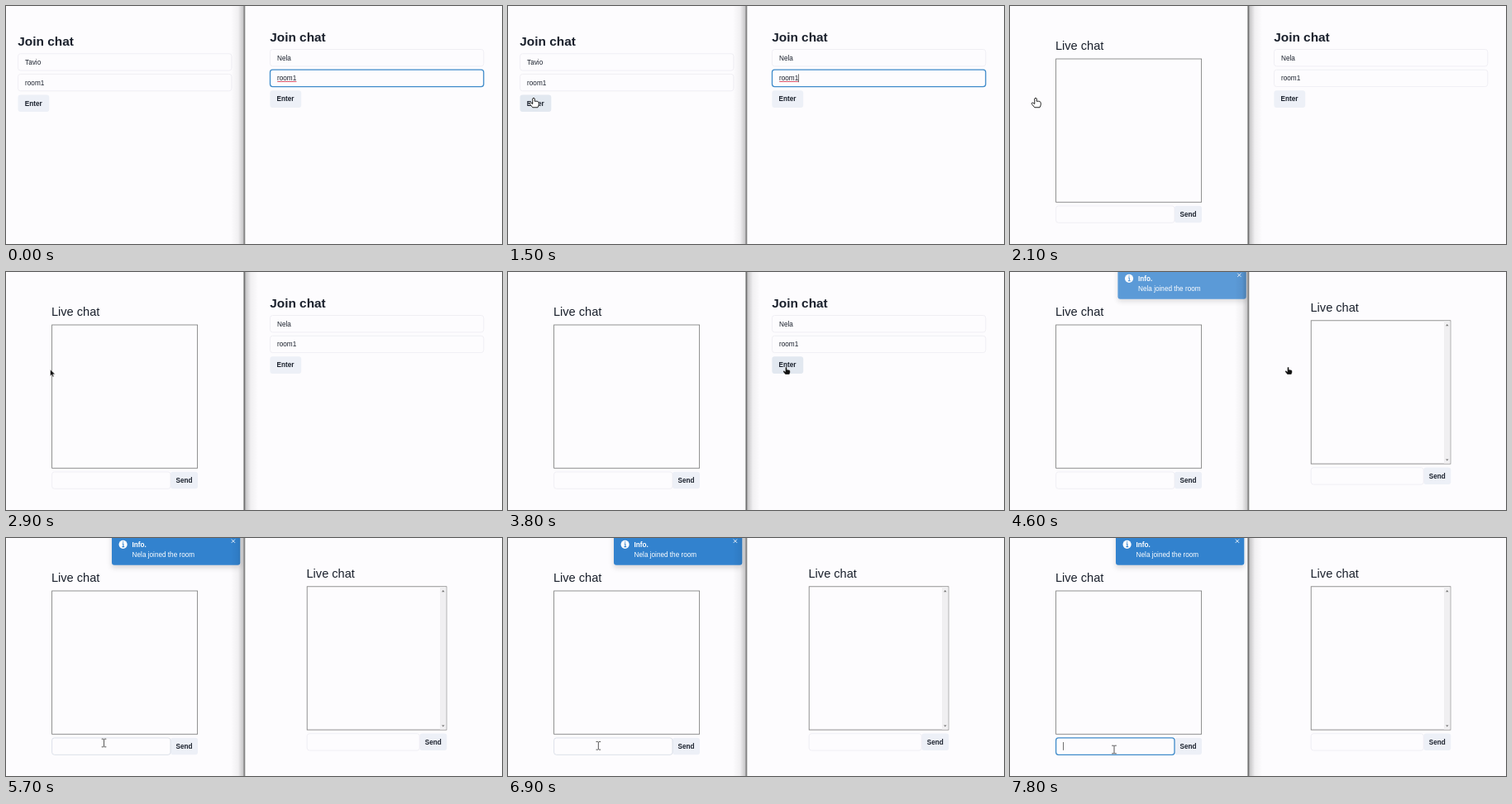
An HTML page for the animation above (8000 ms loop, 600 px wide and 288 px high).

```html
<!DOCTYPE html>
<html lang="en">
<head>
<meta charset="utf-8">
<title>Chat rooms</title>
<style>
  html, body { margin: 0; width: 100%; height: 100%; overflow: hidden; background: #fdfcfe; }
  svg { display: block; width: 100vw; height: 100vh; }
  text { font: 8.2px "Liberation Sans", Arial, sans-serif; fill: #1a202c; white-space: pre; }
  .b { font-weight: 700; }
  .join { font-size: 15.4px; font-weight: 700; }
  .live { font-size: 14.6px; }
  .toast text { fill: #fff; }
</style>
</head>
<body>
<svg viewBox="0 0 600 288" preserveAspectRatio="none">
  <defs>
    <linearGradient id="shade">
      <stop offset="0" stop-opacity="0"/>
      <stop offset=".55" stop-opacity=".05"/>
      <stop offset="1" stop-opacity=".24"/>
    </linearGradient>
    <filter id="drop" x="-10%" y="-20%" width="120%" height="160%">
      <feDropShadow dx="0" dy="3" stdDeviation="3" flood-opacity=".16"/>
    </filter>
  </defs>
  <g id="scene"></g>
</svg>
<script>
const LOOP = 8000, STEP = 100;
const PAPER = '#fdfcfe', BLUE = '#3182ce';
const scene = document.getElementById('scene');

// pointer keys: time, x, y, shape (kept until the next key)
const KEYS = [
  [100, 440, 46, 'arrow'], [200, 420, 66, 'beam'], [300, 400, 88, 'beam'],
  [400, 370, 118, 'arrow'], [600, 250, 146, 'arrow'], [800, 80, 130, 'arrow'],
  [900, 36, 117, 'arrow'], [1000, 30, 113, 'hand'], [1500, 31, 111, 'hand'],
  [2800, 31, 111, 'hand'], [2900, 53.5, 118, 'arrow'], [3100, 130, 130, 'arrow'],
  [3300, 240, 130, 'arrow'], [3500, 325, 118, 'arrow'], [3600, 334, 114.5, 'darkHand'],
  [3800, 336.5, 115, 'darkHand'], [5000, 336.5, 115, 'darkHand'],
  [5100, 322, 127, 'arrow'], [5400, 200, 192, 'arrow'], [5600, 126, 245, 'beam'],
  [5700, 118.5, 248, 'beam'], [5900, 111, 247, 'beam'], [6500, 100, 249, 'beam'],
  [6800, 101, 249, 'beam'], [7100, 126, 256, 'beam']
];

const HAND = 'M-1 .8Q0-.6 1 .8V3.4Q4.8 3 5 5V7L4 9.4H-1L-3.8 6Q-4 4.6-2.8 4.8L-1 6Z';
const SHAPES = {
  arrow: '<path d="M0 0V8L1.9 6.3L3.2 9L4.6 8.4L3.3 5.8H6Z" fill="#111" stroke="#fff" stroke-width=".5"/>',
  beam: '<path d="M-2.8-4.8H-.7L0-4.2L.7-4.8H2.8M0-4.2V4.2M-2.8 4.8H-.7L0 4.2L.7 4.8H2.8" fill="none" stroke="#444" stroke-width=".9"/>',
  hand: `<path d="${HAND}" transform="scale(1.25)" fill="#fff" stroke="#222" stroke-width=".8"/>`,
  darkHand: `<path d="${HAND}" transform="scale(.95)" fill="#111" stroke="#fff" stroke-width=".3"/>`
};

let mouse;

function pointerAt(t) {
  if (t < KEYS[0][0]) return null;
  let i = KEYS.length - 1;
  while (KEYS[i][0] > t) i--;
  const a = KEYS[i], b = KEYS[i + 1] || a;
  const p = b === a ? 0 : (t - a[0]) / (b[0] - a[0]);
  return { x: a[1] + (b[1] - a[1]) * p, y: a[2] + (b[2] - a[2]) * p, shape: a[3] };
}

const over = (x, y, w, h) =>
  mouse && mouse.x > x && mouse.x < x + w && mouse.y > y && mouse.y < y + h;

const rect = (x, y, w, h, fill, more = '') =>
  `<rect x="${x}" y="${y}" width="${w}" height="${h}" fill="${fill}" ${more}/>`;

const text = (x, y, s, cls = '') => `<text x="${x}" y="${y}" class="${cls}">${s}</text>`;

const caret = (x, y) => rect(x, y, .7, 9.8, '#333');

function field(x, y, w, value = '', focus = false) {
  const edge = focus ? '#3f8bca' : over(x, y, w, 20.4) ? '#d3dae4' : '#ecebf1';
  return rect(x, y, w, 20.4, PAPER, `rx="3" stroke="${edge}" stroke-width="${focus ? 1.3 : .8}"`) +
    text(x + 8.5, y + 13.1, value);
}

function button(x, y, w, label, pressed = false) {
  const fill = pressed ? '#cbd5e0' : over(x, y, w, 20.6) ? '#e2e8f0' : '#edf0f7';
  return rect(x, y, w, 20.6, fill, 'rx="3"') + text(x + (w > 35 ? 8.2 : 6.5), y + 13, label, 'b');
}

function joinPage(x, y, name, focus, pressed) {
  return text(x - .3, y - 9.5, 'Join chat', 'join') +
    field(x, y, 258.3, name) +
    field(x, y + 24.7, 258.3, 'room1', focus) +
    (focus ? rect(x + 8.7, y + 38.6, 23.2, .9, '#d8455c') : '') +
    button(x - .1, y + 49.8, 37.8, 'Enter', pressed);
}

function livePage(x, y, w, focus) {
  return text(x - .7, y - 11, 'Live chat', 'live') +
    rect(x, y, w, 173.3, PAPER, 'stroke="#777" stroke-width=".8"') +
    button(x + w - 32.6, y + 177.7, 33, 'Send') +
    field(x, y + 177.9, w - 32.6, '', focus);
}

function scrollbar() {
  return rect(525, 59.3, 7.5, 172.5, '#f0eff1') +
    '<path d="M527 65.2L528.8 63L530.6 65.2ZM527 226.4L528.8 228.6L530.6 226.4Z" fill="#777"/>';
}

function toast(t) {
  const left = 1 - Math.min(1, (t - 4400) / 400);
  const p = 1 - left ** 2.3;
  return `<g class="toast" opacity="${p}" transform="translate(${12 * (1 - p)})">` +
    rect(128, -12, 155.3, 44.7, BLUE, 'rx="3" filter="url(#drop)"') +
    '<circle cx="141.6" cy="7.8" r="5.1" fill="#fff"/>' +
    `<path d="M140.6 7H141.9V10.6M140.4 10.6H143.2M141 4.9H142.2" fill="none" stroke="${BLUE}" stroke-width="1.1"/>` +
    text(152.6, 10.5, 'Info.', 'b') + text(152.6, 22.8, 'Nela joined the room') +
    '<path d="M272.8 1.6L277 5.8M277 1.6L272.8 5.8" stroke="#fff" stroke-width=".9"/></g>';
}

// the window in front casts its shadow over the other one
function divider(leftFront) {
  const turn = leftFront ? 'transform="rotate(180 288.5 144)"' : '';
  return rect(272, 0, 16, 288, 'url(#shade)', turn) +
    rect(287.4, 0, 1.9, 288, leftFront ? '#727272' : '#858585');
}

function draw(t) {
  mouse = pointerAt(t);
  const leftFront = t >= 1900 && t < 4400 || t >= 7500;
  const typing = t < 1900;
  const writing = t >= 7500;

  let out = rect(0, 0, 600, 288, PAPER);
  out += t < 2000 ? joinPage(14.6, 57.7, 'Tavio', false, t >= 1900)
                  : livePage(55.6, 64, 176, writing);
  if (writing) out += caret(64.3, 247);
  if (t > 4400) out += toast(t);

  out += rect(288, 0, 312, 288, PAPER);
  out += t < 4500 ? joinPage(319.5, 52.5, 'Nela', typing, t >= 4400)
                  : livePage(364.2, 58.8, 168.7) + scrollbar();
  if (typing && t % 1000 >= 500) out += caret(351.2, 82.4);

  out += divider(leftFront);
  if (mouse) out += `<g transform="translate(${mouse.x} ${mouse.y})">${SHAPES[mouse.shape]}</g>`;
  scene.innerHTML = out;
}

let shown = -1;
const start = performance.now();
function tick() {
  const t = Math.floor((performance.now() - start) % LOOP / STEP) * STEP;
  if (t !== shown) draw(shown = t);
  requestAnimationFrame(tick);
}
tick();
</script>
</body>
</html>
```
